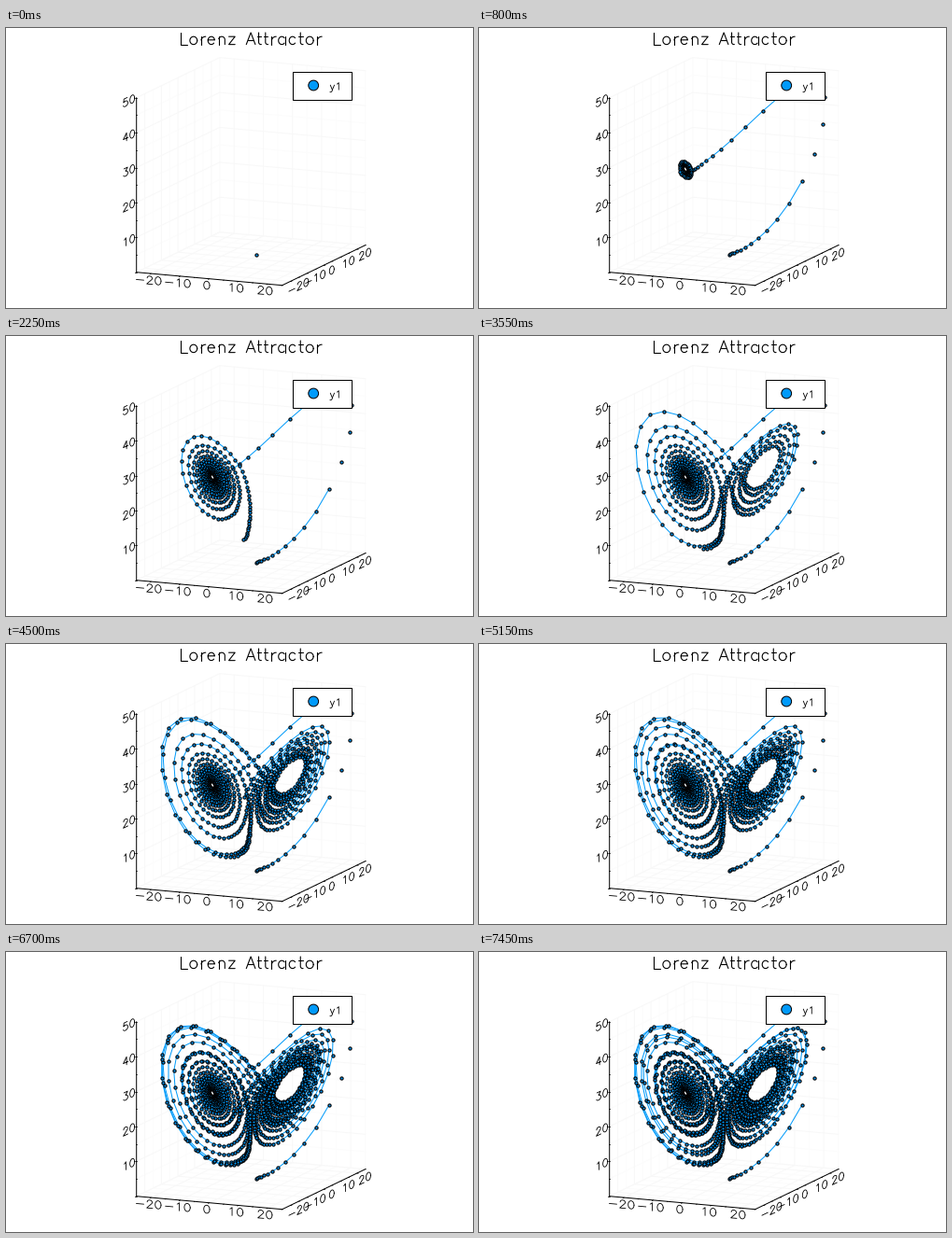
A matplotlib script for the animation above (7500 ms loop, 500 by 300 pixels).

```python
import numpy as np
import matplotlib.pyplot as plt
from matplotlib.animation import FuncAnimation
from matplotlib.collections import LineCollection
from matplotlib.patches import Circle, Rectangle

W, H, DPI = 500, 300, 100
FRAMES, STEP = 150, 10
PX = 72 / DPI  # one pixel in points
BLUE = "#009afa"

# Orthographic view: pixel position of the corner and of the three box edges
CORNER = np.array([139.7, 261.7])
EDGES = np.array([[156.0, 14.0], [89.0, -43.0], [0.0, -187.0]])
LOW = np.array([-25.0, -25.0, 0.0])
HIGH = np.array([25.0, 25.0, 50.0])


def project(p):
    return CORNER + (np.asarray(p, float) - LOW) / (HIGH - LOW) @ EDGES


def lorenz(n, dt=0.02, sigma=10.0, rho=28.0, beta=8 / 3):
    x = y = z = 1.0
    path = []
    for _ in range(n):
        x += dt * (sigma * (y - x))
        y += dt * (x * (rho - z) - y)
        z += dt * (x * y - beta * z)
        path.append((x, y, z))
    return np.array(path)


def clip_segments(p):
    """Cut each segment of the path to the box; also tell which remain."""
    a, d = p[:-1], np.diff(p, axis=0)
    d = np.where(d == 0, 1e-12, d)
    t0, t1 = (LOW - a) / d, (HIGH - a) / d
    enter = np.minimum(t0, t1).max(axis=1).clip(min=0)[:, None]
    leave = np.maximum(t0, t1).min(axis=1).clip(max=1)[:, None]
    segs = np.stack([project(a + enter * d), project(a + leave * d)], axis=1)
    return segs, (enter < leave)[:, 0]


# Single-stroke lettering: width and strokes, baseline 0, cap height 21
def arc(cx, cy, rx, ry, start, end, n=16):
    t = np.radians(np.linspace(start, end, n))
    return list(zip(cx + rx * np.cos(t), cy + ry * np.sin(t)))


glyphs = {" ": (16, [])}


def glyph(char, width, *strokes):
    glyphs[char] = (width, strokes)


bowl = arc(9, 7, 6, 7, 40, 320)
stem = [(4, 14), (4, 0)]
glyph("L", 17, [(4, 21), (4, 0), (16, 0)])
glyph("A", 18, [(1, 0), (9, 21), (17, 0)], [(4, 7), (14, 7)])
glyph("a", 19, bowl, [(15, 14), (15, 0)])
glyph("c", 18, bowl)
glyph("e", 18, [(3, 8), (15, 8)] + arc(9, 7, 6, 7, 8, 320))
glyph("n", 19, stem, [(4, 10)] + arc(9.5, 8.5, 5.5, 5.5, 150, 0) + [(15, 0)])
glyph("o", 19, arc(9.5, 7, 6.5, 7, 0, 360, 24))
glyph("r", 13, stem, arc(12, 7, 8, 7, 175, 90))
glyph("t", 12, [(5, 21)] + arc(9, 4, 4, 4, 180, 280), [(2, 14), (9, 14)])
glyph("y", 16, [(2, 14), (8, 0)], [(14, 14), (8, 0)] + arc(2, 0, 6, 7, -20, -100))
glyph("z", 17, [(3, 14), (14, 14), (3, 0), (14, 0)])
glyph("-", 26, [(4, 9), (22, 9)])
glyph("0", 20, arc(10, 10.5, 7, 10.5, 0, 360, 28))
glyph("1", 20, [(6, 17), (8, 18), (11, 21), (11, 0)])
glyph("2", 20, arc(10, 15.5, 6, 5.5, 180, -35) + [(3, 0), (17, 0)])
glyph("3", 20, [(5, 21), (16, 21), (10, 13)] + arc(10, 6.5, 7, 6.5, 90, -155))
glyph("4", 20, [(13, 0), (13, 21), (3, 7), (18, 7)])
glyph("5", 20, [(15, 21), (5, 21), (4, 12)] + arc(9.5, 7, 7.5, 7, 130, -155))


def lettering(text, center, right, up):
    """Strokes of a text; right and up are the pixel vectors of one unit."""
    basis = np.array([right, up], float)
    half = sum(glyphs[c][0] for c in text) / 2
    pen, strokes = -half, []
    for c in text:
        width, parts = glyphs[c]
        for part in parts:
            strokes.append(center + (np.array(part) + (pen, -10.5)) @ basis)
        pen += width
    return strokes


def tick_labels():
    along_x, along_y, up = (0.45, 0.04), (0.355, -0.172), (0, -0.41)
    out = []
    for v in range(-20, 21, 10):
        out += lettering(str(v), project((v, -25, 0)) + (-2.8, 6.9), along_x, up)
        out += lettering(str(v), project((25, v, 0)) + (8.6, 5.2), along_y, up)
    for v in range(10, 51, 10):
        out += lettering(str(v), project((-25, -25, v)) + (-8.1, 3.2), along_y, up)
    return out


fig = plt.figure(figsize=(W / DPI, H / DPI), dpi=DPI, facecolor="white")
ax = fig.add_axes([0, 0, 1, 1])
ax.set_xlim(0, W)
ax.set_ylim(H, 0)
ax.axis("off")


def strokes(segs, color="black", width=1.0, z=1):
    coll = LineCollection(segs, colors=color, linewidths=width * PX, zorder=z, capstyle="round")
    return ax.add_collection(coll, autolim=False)


# Grid on the floor and the two back walls
major, minor = [], []
for v in range(-25, 26, 5):
    lines = major if v % 10 == 0 else minor
    lines.append(project([(v, -25, 0), (v, 25, 0), (v, 25, 50)]))
    lines.append(project([(25, v, 0), (-25, v, 0), (-25, v, 50)]))
for v in range(0, 51, 5):
    lines = major if v % 10 == 0 else minor
    lines.append(project([(-25, -25, v), (-25, 25, v), (25, 25, v)]))
strokes(minor, "#fcfcfc", z=0)
strokes(major, "#f8f8f8", z=0)

# Axes with ticks
strokes([project([(-25, -25, 50), (-25, -25, 0), (25, -25, 0), (25, 25, 0)])])


def tick(point, way, value):
    start = project(point)
    size = 1.4 if value % 10 == 0 else 0.8
    return [start, start + size * np.array(way)]


ticks = []
for v in range(-25, 26, 5):
    ticks += [tick((v, -25, 0), (-0.9, 0.43), v),
              tick((25, v, 0), (1, 0.09), v),
              tick((-25, -25, v + 25), (-1, 0), v + 25)]
strokes(ticks, width=0.8)

# Curve
path = lorenz((FRAMES - 1) * STEP + 1)
dots = project(path)
segs, inside = clip_segments(path)
curve = strokes([], BLUE, z=2)
marks, = ax.plot([], [], "o", ms=3.2 * PX, mfc=BLUE, mec="black", mew=1.1 * PX,
                 zorder=3, clip_on=False)

# Legend, title and labels
ax.add_patch(Rectangle((306.5, 46.5), 63, 30, fc="white", ec="black", lw=PX, zorder=4))
ax.add_patch(Circle((329.2, 61.5), 5.4, fc=BLUE, ec="black", lw=PX, zorder=5))
strokes(lettering("y1", np.array([353.0, 62.4]), (0.36, 0), (0, -0.36)), width=0.85, z=5)
strokes(lettering("Lorenz Attractor", np.array([261.8, 11.3]), (0.604, 0), (0, -0.604)),
        width=1.1, z=5)
strokes(tick_labels(), width=0.85, z=5)


def draw(i):
    n = i * STEP + 1
    marks.set_data(dots[:n, 0], dots[:n, 1])
    curve.set_segments(segs[:n - 1][inside[:n - 1]])
    return marks, curve


anim = FuncAnimation(fig, draw, frames=FRAMES, init_func=lambda: draw(0),
                     interval=50, repeat=True, repeat_delay=0, blit=False)
plt.show()
```
